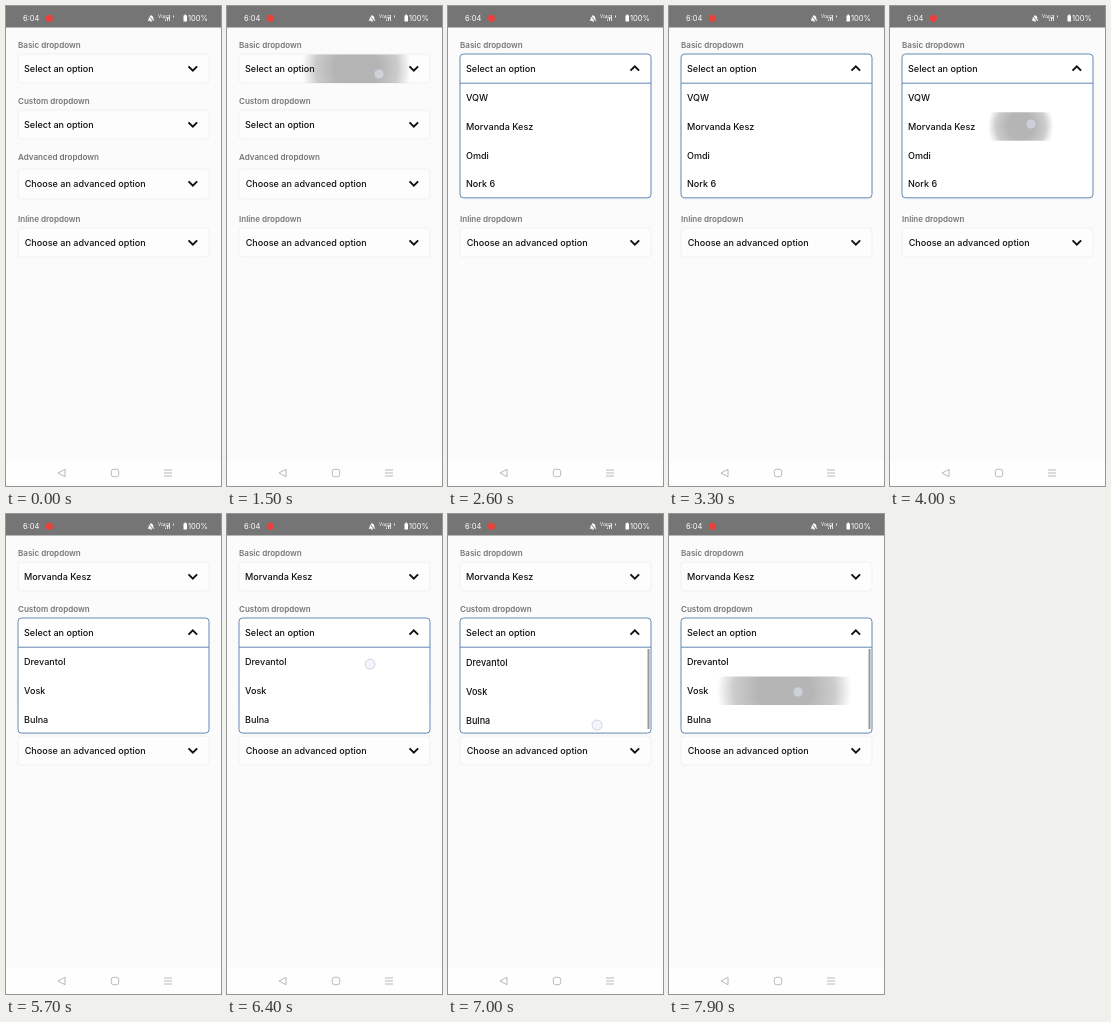
Write an HTML page that moves like this. It is 215 by 480 pixels and loops after 8000 ms.

```html
<!DOCTYPE html>
<html lang="en">
<head>
<meta charset="utf-8">
<title>Dropdowns</title>
<style>
  html, body { margin: 0; height: 100%; overflow: hidden; background: #fbfbfb; }
  svg { display: block; }
  text { font: 500 9.05px Inter, sans-serif; fill: #111; }
  .label { font-size: 8.05px; font-weight: 600; fill: #777; }
  .status text { font-size: 7.5px; font-weight: 400; fill: #fff; }
  .status .tiny { font-size: 4.5px; }
  .box { fill: #fdfdfd; stroke: #f1f1f1; }
  .open > .box { fill: #fff; stroke: #6288b5; }
  .rule { stroke: #6288b5; visibility: hidden; }
  .open > .rule { visibility: visible; }
  .chevron { fill: none; stroke: #111; stroke-width: 1.9; }
  .nav { fill: none; stroke: #b0b0b0; stroke-width: .9; }
</style>
</head>
<body>
<svg id="stage" width="215" height="480" viewBox="0 0 215 480">
  <defs>
    <radialGradient id="ink">
      <stop offset=".4" stop-opacity=".29"/>
      <stop offset=".75" stop-opacity=".2"/>
      <stop offset="1" stop-opacity="0"/>
    </radialGradient>
  </defs>
  <rect width="215" height="480" fill="#fbfbfb"/>
  <g class="status">
    <rect width="215" height="21.500" fill="#757575"/>
    <text x="17" y="15">6:04</text>
    <circle cx="43.3" cy="12.3" r="3.6" fill="#e8413c"/>
    <path d="M142 14.5h6l-1-1.5v-2q-2-3-4 0v2zM144 15.5h2" fill="#fff" stroke="#fff" stroke-width=".5"/>
    <path d="M142 9l6 7" stroke="#757575"/>
    <text class="tiny" x="152" y="12">Vo</text>
    <text class="tiny" x="157" y="13">4G</text>
    <path d="M159.500 15v-1.500M161.500 15v-4M163.500 15v-6M167.500 11.500v-2" stroke="#fff" opacity=".8"/>
    <path d="M177.500 9.500h1v-1h1.500v1h1v6h-3.500z" fill="#fff"/>
    <text x="182" y="15">100%</text>
  </g>
  <g id="fields"></g>
  <svg id="rippleClip" x="12" width="191" height="28.500"><circle id="ripple" cy="14" fill="url(#ink)"/></svg>
  <circle id="touch" r="5" fill="#e6ebfa" fill-opacity=".5" stroke="#a9adbb" stroke-opacity=".6" stroke-width=".8"/>
  <rect y="455" width="215" height="25" fill="#fefefe"/>
  <path class="nav" d="M52 467l7-3.700v7.400zM158 464h8M158 467h8M158 470h8"/>
  <rect class="nav" x="105.300" y="463.300" width="7.400" height="7.400" rx="2.200"/>
</svg>
<script>
const $ = id => document.getElementById(id);
const LOOP = 8000, HEAD = 29, ROW = 28.7, MID = 107;

const label = (name, y) => `<text class="label" x="12" y="${y}">${name} dropdown</text>`;

const field = (id, y, prompt, rows = [], x = 18, height = HEAD) => `
  <g id="${id}" transform="translate(0 ${y})">
    <rect class="box" x="12" width="191" height="${height}" rx="3.5"/>
    <path class="rule" d="M12 29.200h191"/>
    <text class="prompt" x="${x}" y="18">${prompt}</text>
    <path class="chevron" d="M-4.300 -2.200L0 2.200L4.300 -2.200" transform="translate(${x / 2 + 177.500} 14.500)"/>
    <svg class="list" width="215" height="0"><g class="rows">
      ${rows.map((row, i) => `<text x="18" y="${47.3 + ROW * i}">${row}</text>`).join('')}
    </g></svg>
    <path class="bar" d="M200.500 31v80" stroke="#999" stroke-width="2" opacity="0"/>
  </g>`;

const cars = ['VQW', 'Morvanda Kesz', 'Omdi', 'Nork 6'];
const brands = ['Drevantol', 'Vosk', 'Bulna'];
const advanced = 'Choose an advanced option';

// Later fields lie on top, so the upper lists cover the fields below them.
$('fields').innerHTML =
  label('Inline', 216) + field('inline', 222, advanced, [], 18.7) +
  label('Advanced', 154) + field('advanced', 163, advanced, [], 18.7, 30) +
  label('Custom', 98) + field('custom', 104, 'Select an option', brands) +
  label('Basic', 42) + field('basic', 48, 'Select an option', cars);

const taps = [
  { at: 1375, x: 152, y: 68, top: 48.5 },
  { at: 3925, x: 141, y: 118, top: 106.2 },
  { at: 4750, x: 150, y: 124, top: 104.5 },
  { at: 7745, x: 129, y: 178, top: 162.5 },
];

const clamp = v => Math.min(1, Math.max(0, v));
const ramp = (t, from, to) => clamp((t - from) / (to - from));
const ease = v => 1 - (1 - v) ** 2;
const mix = (a, b, v) => a + (b - a) * v;
const set = (el, attrs) => {
  for (const key in attrs) el.setAttribute(key, attrs[key]);
};

function drawField(id, open, up, count) {
  const root = $(id), part = name => root.querySelector('.' + name);
  const height = HEAD + count * ROW * open;
  root.classList.toggle('open', open > 0);
  set(part('box'), { height });
  set(part('list'), { height: open > 0 ? height : 0 });
  set(part('chevron'), { transform: `translate(186.8 14.5) scale(1 ${up ? -1 : 1})` });
}

function drawTouch(t) {
  const tap = taps.find(({ at }) => t >= at && t < at + 650);
  set($('rippleClip'), { visibility: tap ? 'visible' : 'hidden' });
  let x = 0, y = 0, alpha = 0;
  if (tap) {
    const age = t - tap.at, grow = clamp(age / 250);
    set($('rippleClip'), { y: tap.top });
    set($('ripple'), {
      cx: mix(tap.x, MID, grow) - 12,
      r: 108 * grow,
      opacity: 1 - ramp(age, 300, 550),
    });
    ({ x, y } = tap);
    alpha = age < 270 ? 1 : 0;
  } else if (t >= 2300 && t < 2600) {
    [x, y, alpha] = [184, 69, .3];
  } else if (t >= 6350 && t < 7080) {
    const drag = ease(ramp(t, 6400, 7000));
    [x, y, alpha] = [mix(143, 149, drag), mix(150, 211, drag), 1];
  }
  set($('touch'), { cx: x, cy: y, opacity: alpha });
}

function draw(t) {
  const basicOpen = ease(ramp(t, 1750, 2050)) * (1 - ease(ramp(t, 4220, 4420)));
  const customOpen = ease(ramp(t, 5050, 5350));
  drawField('basic', basicOpen, t >= 1750 && t < 4220, cars.length);
  drawField('custom', customOpen, t >= 5050, brands.length);
  $('basic').querySelector('.prompt').textContent = t >= 4220 ? cars[1] : 'Select an option';

  // Dragging past the end stretches the list a little.
  const pull = ease(ramp(t, 6400, 7000)) * (1 - ease(ramp(t, 7080, 7350)));
  set($('custom').querySelector('.rows'), { transform: `scale(1 ${1 + .016 * pull})` });
  set($('custom').querySelector('.bar'), { opacity: ramp(t, 6400, 6500) });
  drawTouch(t);
}

function frame() {
  draw(performance.now() % LOOP);
  requestAnimationFrame(frame);
}
frame();
</script>
</body>
</html>
```
